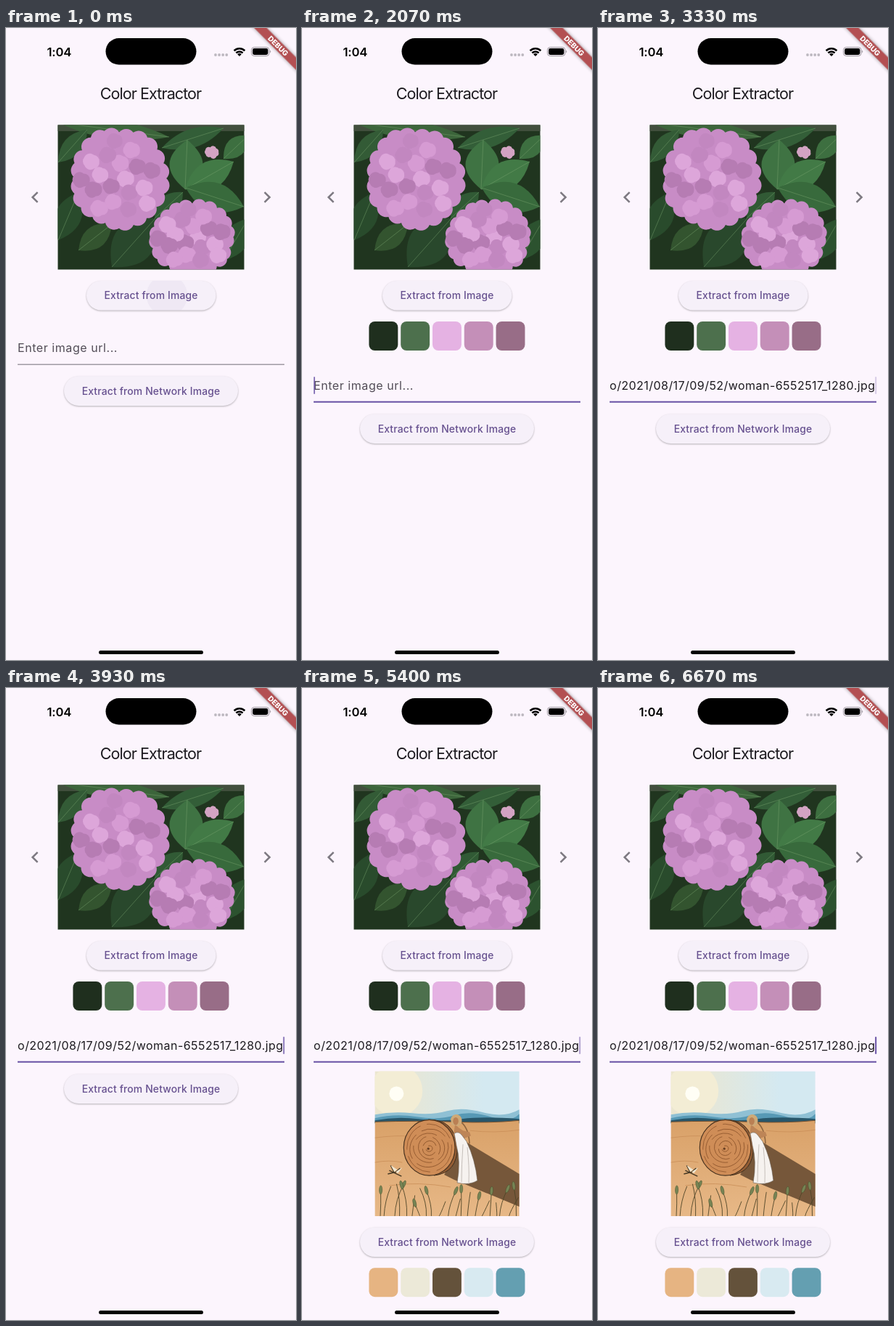
Recreate the animation shown at these times as an HTML page. Size 400 by 870 pixels, loop 6.74 s.

```html
<!DOCTYPE html>
<html lang="en">
<head>
<meta charset="utf-8">
<title>Color Extractor</title>
<style>
  html, body { margin: 0; width: 100%; height: 100%; overflow: hidden; background: #fcf5fd; }
  svg { display: block; width: 100vw; height: 100vh; }
  text { font-family: Inter, Roboto, sans-serif; }
  .button rect { fill: #f6f0f9; filter: drop-shadow(0 1px 1px rgba(0, 0, 0, .28)); }
  .button text { font-size: 13.9px; font-weight: 500; letter-spacing: .15px; fill: #66508f; text-anchor: middle; }
  .field { font-size: 16px; letter-spacing: .45px; }
  #hint { letter-spacing: .56px; }
</style>
</head>
<body>
<svg id="stage" viewBox="0 0 400 870" xmlns="http://www.w3.org/2000/svg"></svg>
<script>
const LOOP = 6740, STEP = 200 / 3;
const PRIMARY = '#6750a4';
const T = {
  palette: 530, focus: 1500, caret: 1560, paste: 2425,
  tap: 4270, expand: 4330, picture: 4920, palette2: 5120
};

let seed = 7;
const rnd = (a = 0, b = 1) => {
  seed = (seed * 16807) % 2147483647;
  return a + (b - a) * seed / 2147483647;
};
const repeat = (n, f) => Array.from({ length: n }, (_, i) => f(i)).join('');
const clamp = v => Math.max(0, Math.min(1, v));
const mix = (a, b, p) => a + (b - a) * p;

function swatches(id, y, colors) {
  return `<g id="${id}">` + colors.map((c, i) =>
    `<rect x="${92.4 + i * 43.8}" y="${y}" width="39.9" height="40" rx="8" fill="${c}"/>`).join('') + '</g>';
}

function button(id, x, y, w, label) {
  return `<g id="${id}" class="button">
    <clipPath id="${id}Clip"><rect x="${x}" y="${y}" width="${w}" height="40.6" rx="20.3"/></clipPath>
    <rect x="${x}" y="${y}" width="${w}" height="40.6" rx="20.3"/>
    <circle id="${id}Ink" cy="${y + 20}" fill="${PRIMARY}" clip-path="url(#${id}Clip)"/>
    <text x="200" y="${y + 25.2}">${label}</text>
  </g>`;
}

// Round shape with a scalloped edge.
function bloom(cx, cy, rx, ry, n, fill) {
  const pts = Array.from({ length: n }, (_, i) => {
    const a = i / n * Math.PI * 2, k = rnd(.92, 1.03);
    return [cx + Math.cos(a) * rx * k, cy + Math.sin(a) * ry * k].map(v => v.toFixed(1)).join(' ');
  });
  const r = (rx + ry) * 1.9 / n;
  return `<path fill="${fill}" d="M${pts[0]}` +
    [...pts.slice(1), pts[0]].map(p => `A${r} ${r} 0 0 1 ${p}`).join('') + '"/>';
}

function leaf(x1, y1, x2, y2, w, fill) {
  const mx = (x1 + x2) / 2, my = (y1 + y2) / 2;
  const len = Math.hypot(x2 - x1, y2 - y1), nx = (y1 - y2) / len * w, ny = (x2 - x1) / len * w;
  return `<path fill="${fill}" d="M${x1} ${y1}Q${mx + nx} ${my + ny} ${x2} ${y2}Q${mx - nx} ${my - ny} ${x1} ${y1}"/>
    <path d="M${x1} ${y1}L${x2} ${y2}" stroke="#7ba56f" stroke-opacity=".45"/>`;
}

function head(cx, cy, rx, ry) {
  const tones = ['#dda6da', '#b67cb3', '#d69bd3', '#c287c0'];
  return bloom(cx, cy, rx, ry, 20, '#c88cc6') + repeat(18, i => {
    const a = i * 2.4, d = Math.sqrt((i + .5) / 18) * .82;
    return bloom(cx + Math.cos(a) * rx * d, cy + Math.sin(a) * ry * d, 12, 10, 5, tones[i % 4]);
  });
}

function photo() {
  return `<clipPath id="photoClip"><rect x="71.5" y="133.5" width="257" height="199"/></clipPath>
  <g clip-path="url(#photoClip)">
    <rect x="71" y="133" width="258" height="200" fill="#20351f"/>
    <rect x="71" y="133" width="258" height="9" fill="#414f3d"/>` +
    leaf(225, 150, 72, 130, 26, '#3c653b') +
    leaf(72, 185, 112, 140, 26, '#335b36') +
    leaf(72, 292, 100, 226, 36, '#294b2c') +
    leaf(100, 306, 146, 270, 30, '#33542f') +
    leaf(146, 329, 206, 262, 56, '#29482c') +
    leaf(215, 165, 300, 138, 26, '#335e38') +
    leaf(247, 222, 250, 154, 46, '#3f7343') +
    leaf(247, 222, 314, 184, 38, '#427a46') +
    leaf(248, 220, 328, 246, 40, '#386a3c') +
    leaf(300, 180, 334, 148, 26, '#3d6f40') +
    leaf(205, 262, 244, 226, 28, '#315a35') +
    leaf(300, 320, 334, 262, 34, '#2c522f') +
    bloom(284, 171, 10, 7, 7, '#d3a3c3') +
    head(156, 207, 65, 68) + head(257, 288, 58, 50) + '</g>';
}

function stalk(i) {
  const x = 6 + i * 9.4 + rnd(-3, 3), top = rnd(152, 182), lean = rnd(-9, 14);
  const tip = `${x + lean} ${top}`;
  return `<path d="M${x} 200Q${x + 1} ${top + 20} ${tip}" fill="none" stroke="#4f4528" stroke-width=".9"/>` +
    (i % 2 ? '' : `<ellipse cx="${x + lean}" cy="${top}" rx="2.1" ry="6" fill="#768454" stroke="#46502d" stroke-width=".5"
      transform="rotate(${lean * 2} ${tip})"/>`);
}

function woman() {
  return `<path d="M116 68Q130 76 131 100" fill="none" stroke="#8d653f" stroke-width="1.6"/>
    <path d="M111 73L116 78L122 82L131 84L133 89L123 93L113 94L109 88Z" fill="#bd8557"/>
    <path d="M105 66Q108 58 115 60Q122 63 120 72L116 76L106 74Z" fill="#ceaa78"/>
    <ellipse cx="112" cy="69" rx="3.8" ry="5.4" fill="#ba8054"/>
    <path d="M110 86Q116 82 121 89L127 97Q139 122 142 151Q131 158 114 154Q119 124 113 103Z" fill="#f6f2ef" stroke="#655b50" stroke-width=".6"/>
    <path d="M122 101Q120 130 120 153M128 105Q131 132 130 154" fill="none" stroke="#b9b2ac" stroke-width=".8"/>`;
}

function picture() {
  return `<svg id="picture" x="100.4" y="527.5" width="199.4" height="199.4" viewBox="0 0 200 200">
    <linearGradient id="sky"><stop offset=".1" stop-color="#ebe6d0"/><stop offset=".75" stop-color="#d4e9f1"/></linearGradient>
    <linearGradient id="field" x2="0" y2="1"><stop stop-color="#d9a168"/><stop offset="1" stop-color="#e7b887"/></linearGradient>
    <rect width="200" height="70" fill="url(#sky)"/>
    <circle cx="30" cy="27" r="36" fill="#f3edd5"/>
    <circle cx="30" cy="31" r="10" fill="#fffef5"/>
    <path d="M0 60Q25 55 52 58T100 55T150 57T200 53V72H0Z" fill="#8fc0d4"/>
    <path d="M0 65Q28 58 58 63T110 61T160 63T200 59V72H0Z" fill="#5799b5"/>
    <path d="M0 68Q30 62 60 66T120 66T200 66V72H0Z" fill="#28566a"/>
    <path d="M0 70Q60 68 110 70T200 68V200H0Z" fill="url(#field)"/>
    <path d="M0 70Q60 68 110 70T200 68" fill="none" stroke="#77512f"/>
    <path d="M0 92Q30 88 50 90M132 82Q165 86 200 81M0 126Q20 122 38 126M20 158Q60 152 105 160" fill="none" stroke="#c98f58" stroke-width=".8"/>
    <path d="M122 95L200 142V187L110 150L96 143Z" fill="#76573a"/>
    <path d="M74 67Q110 66 114 104Q115 140 82 144Z" fill="#945d34" stroke="#41301f"/>
    <ellipse cx="75.5" cy="105.5" rx="35.5" ry="38.5" fill="#cf8d57" stroke="#4b3420" stroke-width="1.2"/>` +
    repeat(6, i => `<ellipse cx="${75.5 - i * .3}" cy="106" rx="${31 - i * 5.4}" ry="${33 - i * 5.7}" fill="none"
      stroke="#8d552c" stroke-width=".8" stroke-dasharray="${40 - i * 4} 9" transform="rotate(${i * 50} 75 106)"/>`) +
    `<circle cx="74" cy="107" r="1.6" fill="#684023"/>
    ${woman()}
    <path d="M20 137L37 145M27 140L22 130M28 140L35 134M26 140L18 142" stroke="#463925" stroke-width="1.5"/>
    <path d="M27 139L22 130L31 136ZM29 139L38 133L32 141Z" fill="#f0e6cf"/>` +
    repeat(21, stalk) + '</svg>';
}

function statusBar() {
  return `<text x="56.5" y="38.6" font-size="16.6" font-weight="600" letter-spacing="-.2">1:04</text>
    <rect x="137.5" y="14" width="125" height="36.5" rx="18.25"/>` +
    repeat(4, i => `<circle cx="${289 + i * 5.1}" cy="37" r="1.9" fill="#bdb8c0"/>`) +
    `<g fill="none" stroke="#000" stroke-width="2.6">
      <path d="M314.6 31.2A10.6 10.6 0 0 1 329.4 31.2"/><path d="M317.4 34.4A6.6 6.6 0 0 1 326.6 34.4"/>
    </g>
    <path d="M322 39L319.2 36.2A4 4 0 0 1 324.8 36.2Z"/>
    <rect x="338.5" y="26.5" width="24.5" height="12" rx="3.8" fill="none" stroke="#99949b"/>
    <rect x="340.1" y="28.1" width="21.3" height="8.8" rx="2.4"/>
    <path d="M364.2 30.6Q366.4 32.5 364.2 34.4Z" fill="#99949b"/>
    <g transform="translate(400 0) rotate(45) scale(1.018)">
      <rect x="-60" y="28" width="120" height="12" fill="#b34f52" style="filter:drop-shadow(0 0 2.5px rgba(0,0,0,.4))"/>
      <text y="37.7" font-size="9.8" font-weight="800" fill="#fff" text-anchor="middle">DEBUG</text>
    </g>`;
}

const stage = document.getElementById('stage');
stage.innerHTML = `<rect width="400" height="870" fill="#fcf5fd"/>
  ${statusBar()}
  <text x="199.5" y="97.8" font-size="21.6" letter-spacing="-.95" text-anchor="middle" fill="#1d1b20">Color Extractor</text>
  ${photo()}
  <path d="M43.6 226.2L36.6 233L43.6 239.8M356.6 226.2L363.6 233L356.6 239.8" fill="none" stroke="#7d7981" stroke-width="2.5"/>
  ${button('local', 111, 348, 178.5, 'Extract from Image')}
  ${swatches('colors', 404, ['#1f2f1e', '#4d704d', '#e5b2e3', '#c48fb8', '#986d87'])}
  <g id="form">
    <text id="hint" class="field" x="16" y="446" fill="#524d57">Enter image url...</text>
    <clipPath id="fieldClip"><rect x="16" y="420" width="368" height="44"/></clipPath>
    <text id="url" class="field" x="382.6" y="446" text-anchor="end" fill="#1d1b20" clip-path="url(#fieldClip)">o/2021/08/17/09/52/woman-6552517_1280.jpg</text>
    <rect id="line" x="16" width="368"/>
    <rect id="caret" y="428" width="2" height="24" rx="1" fill="${PRIMARY}"/>
  </g>
  ${picture()}
  ${button('network', 80, 479.3, 240, 'Extract from Network Image')}
  ${swatches('colors2', 798.2, ['#e6b482', '#ece9d8', '#64523b', '#d8eaf1', '#649fb1'])}
  <rect x="128" y="857" width="144" height="5" rx="2.5"/>`;

const el = {};
stage.querySelectorAll('[id]').forEach(n => el[n.id] = n);
const set = (id, attrs) => { for (const k in attrs) el[id].setAttribute(k, attrs[k]); };
const show = (id, on) => set(id, { visibility: on ? 'visible' : 'hidden' });

// Caret holds, fades out in four steps, rests, fades back in.
function blink(t) {
  const p = (t / 1005) % 1;
  if (p < .5) return 1;
  if (p < .65) return .75 - .25 * Math.floor((p - .5) / .0375);
  return p < .85 ? 0 : .25 * Math.floor((p - .85) / .0375);
}

function ink(id, cx, full, age, alpha) {
  const grow = 1 - (1 - clamp(age / 225)) ** 2;
  set(id + 'Ink', { cx, r: age < 0 ? 0 : full * mix(.3, 1, grow), 'fill-opacity': alpha });
}

function draw(time) {
  const t = Math.floor((Math.floor(time / 10) * 10 + 5) / STEP) * STEP;
  const drop = t >= T.palette ? 52 : 0, gap = t >= T.expand ? 211.2 : 0;

  // The first ripple stalls while the palette is computed.
  const age = t < T.palette ? Math.min(t, STEP) : 225;
  ink('local', 222, 94, age, t < STEP ? .05 : t < T.palette ? .1 : t < 590 ? .04 : 0);
  ink('network', 198, 124, t - T.tap, .13 * clamp((t - T.tap) / 75) * (1 - clamp((t - T.tap - 225) / 260)));

  set('form', { transform: `translate(0 ${drop})` });
  set('network', { transform: `translate(0 ${drop + gap})` });
  show('colors', t >= T.palette);
  show('picture', t >= T.picture);
  show('colors2', t >= T.palette2);

  const pasted = t >= T.paste, focus = clamp((t - T.focus) / 167);
  show('hint', !pasted);
  show('url', pasted);
  const tone = [[125, 103], [120, 80], [130, 164]].map(([a, b]) => Math.round(mix(a, b, focus)));
  const weight = mix(1.1, 2, focus);
  set('line', { y: 463.7 - weight, height: weight, fill: `rgb(${tone})` });
  set('caret', {
    x: pasted ? 382.2 : 16,
    opacity: t < T.caret ? 0 : blink(t - (pasted ? T.paste : T.caret))
  });
}

function tick() {
  draw(performance.now() % LOOP);
  requestAnimationFrame(tick);
}
tick();
</script>
</body>
</html>
```
